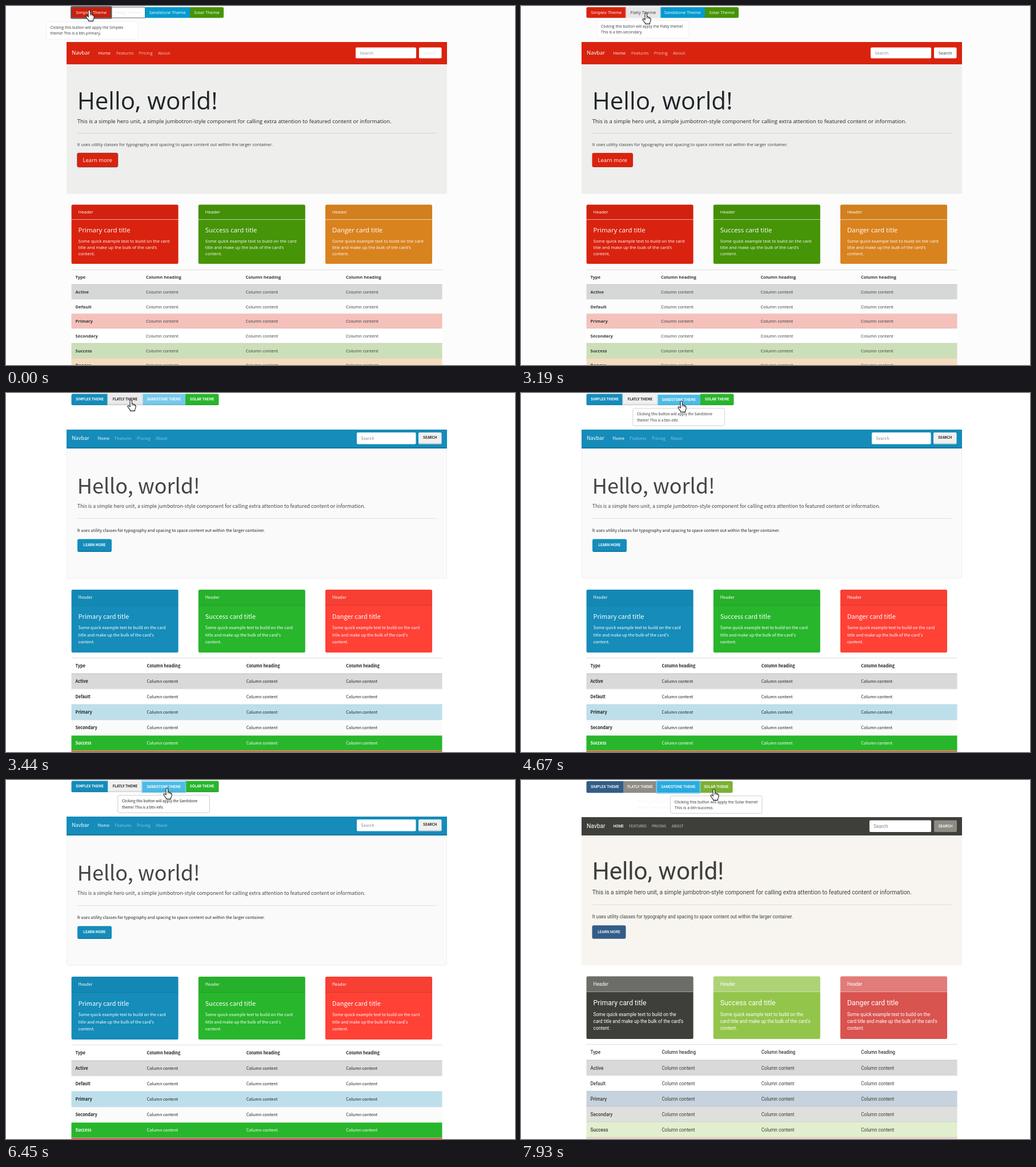
Recreate the animation shown at these times as an HTML page with a canvas. Size 891 by 628 pixels, loop 8 s.

```html
<!DOCTYPE html>
<html lang="en">
<head>
<meta charset="utf-8">
<title>Theme switcher</title>
<style>
html, body { margin: 0; width: 100%; height: 100%; overflow: hidden; background: #fff; }
canvas { display: block; }
</style>
</head>
<body>
<canvas id="stage" width="891" height="628"></canvas>
<script>
const ctx = document.getElementById('stage').getContext('2d');
const LOOP = 8000;
const LEFT = 106, RIGHT = 772;
const HAN = '"Noto Sans CJK JP", "Noto Sans CJK SC", "Noto Sans CJK", "Noto Sans", sans-serif';

function textWidth(weight) {
  ctx.font = `${weight} 100px ${HAN}`;
  return ctx.measureText('Hello, world!').width;
}
// Without a light face the regular one is used, which runs wider.
const hasLight = textWidth(300) < textWidth(400) - 1;
const lightSize = hasLight ? 1 : 0.957;

const themes = [
  {
    font: '"Open Sans", sans-serif', size: 7.6, tip: 6.65, bg: '#fcfcfc', ink: '#373a3c', heavy: 700,
    buttons: { x: [114.5, 184, 243.5, 322, 381], y: 2, h: 18.8, textY: 11.5, size: 7.6, weight: 400,
      fill: ['#d9230f', '#ffffff', '#029acf', '#469408'], hover: ['#c8200e', '#e6e6e6', '#0287b6', '#3c7e07'] },
    nav: { y: 63, h: 39, textY: 82, fill: '#d9230f', link: '#f5c3bd', x: [161.5, 193, 232.7, 266],
      brand: 9.5, size: 7.6, weight: 400, input: [612, 72.5, 106, 19], button: [723, 72.5, 39.5, 19] },
    hero: { bottom: 328.5, fill: '#eeeeed', base: 181, title: 42.1, lead: 9.5, light: 400, color: '#212529',
      leadY: 201.3, rule: 222, rest: 242.2, button: [124.5, 257, 71.5, 25], fill2: '#d9230f', label: 9.5, labelY: 269.7, weight: 400 },
    cards: { y: 347.5, h: 103.5, line: 373, headY: 360.3, title: 11.4, titleY: 392.2, textY: 411.2, pitch: 11.2,
      fill: ['#d9230f', '#469408', '#d9831f'], shade: 'rgba(0,0,0,.03)', edge: 'rgba(255,255,255,.6)',
      text: ['Some quick example text to build on the card', "title and make up the bulk of the card's"] },
    table: { top: 461, headY: 474, y: 487, pitch: 25.7, x: [121.5, 245, 419.5, 595],
      fill: ['#d6d8d7', '#fcfcfc', '#f4c1bb', '#ffffff', '#cbe0b9', '#f4dcbf'] },
    tipEdge: '#f0f0f0'
  },
  {
    font: HAN, size: 7.32, tip: 6.4, bg: '#ffffff', ink: '#222222', heavy: 700, upper: true, raised: true,
    buttons: { x: [114.5, 178.5, 238.5, 314, 372.5], y: 1.5, h: 19.7, textY: 10.7, size: 6.13, weight: 700,
      fill: ['#158cba', '#f0f0f0', '#75caeb', '#28b62c'], hover: ['#127ba3', '#eaeaea', '#4fbbe5', '#23a127'] },
    nav: { y: 64, h: 33, textY: 79, fill: '#158cba', link: '#8ac5dc', x: [160.5, 190.5, 229, 262],
      brand: 9.15, size: 7.32, weight: 400, input: [614, 69, 103.5, 20.5], button: [722, 69, 40.5, 20.5] },
    hero: { bottom: 324.5, fill: '#fafafa', base: 176, title: 37.66 * lightSize, lead: 9.15 * lightSize, light: 300,
      color: hasLight ? '#222222' : '#444444',
      leadY: 197.5, rule: 219, rest: 240, button: [125, 255.5, 60, 22.5], fill2: '#158cba', label: 6.13, labelY: 265.8, weight: 700 },
    cards: { y: 344, h: 110, line: 371, headY: 357.5, title: 10.98, titleY: 391, textY: 410.8, pitch: 12.35,
      fill: ['#158cba', '#28b62c', '#ff4136'], shade: 'rgba(0,0,0,.03)', edge: 'rgba(0,0,0,.13)',
      text: ['Some quick example text to build on the card', "title and make up the bulk of the card's"] },
    table: { top: 463, headY: 477, y: 490.5, pitch: 27.1, x: [121.5, 246.5, 420.7, 595.3], white: true,
      fill: ['#d9d9d9', '#ffffff', '#bddfec', '#fbfbfb', '#28b62c', '#ff4136'] },
    tipEdge: '#cccccc'
  },
  {
    font: 'Roboto, sans-serif', size: 8.18, tip: 7.16, bg: '#ffffff', ink: '#3e3f3a', heavy: 500, upper: true, upperNav: true,
    buttons: { x: [114.5, 179, 237.7, 313, 370.5], y: 2, h: 20.5, textY: 12, size: 6.43, weight: 500,
      fill: ['#325d88', '#8e8c84', '#29abe0', '#93c54b'], hover: ['#284a6c', '#7a7871', '#1b93c6', '#7cb033'] },
    nav: { y: 65, h: 32, textY: 80.5, fill: '#3e3f3a', link: '#a2a29f', x: [161.5, 189, 229, 263.5],
      brand: 10.23, size: 6.43, weight: 500, input: [610, 70.5, 108, 20.5], button: [723, 70.5, 40, 20.5] },
    hero: { bottom: 324.5, fill: '#f8f5f0', base: 174.3, title: 42.1, lead: 10.23, light: 400, color: '#3e3f3a',
      leadY: 196.3, rule: 218, rest: 238.7, button: [124.5, 254.3, 59, 23.5], fill2: '#325d88', label: 6.43, labelY: 265.8, weight: 500 },
    cards: { y: 343.5, h: 109.5, line: 370, headY: 357, title: 12.28, titleY: 390, textY: 410, pitch: 12.25,
      fill: ['#3e3f3a', '#93c54b', '#d9534f'], shade: 'rgba(255,255,255,.24)', edge: 'rgba(255,255,255,.5)',
      text: ['Some quick example text to build on the', "card title and make up the bulk of the card's"] },
    table: { top: 462, headY: 476.3, y: 489.8, pitch: 27.05, x: [121.5, 246.5, 420.7, 595.3],
      fill: ['#d9d9d9', '#ffffff', '#c6d2de', '#dfdfde', '#e1efcf', '#f0d3cd'] },
    tipEdge: '#cccccc'
  }
];

const labels = ['Simplex Theme', 'Flatly Theme', 'Sandstone Theme', 'Solar Theme'];
const applies = 'Clicking this button will apply the ';
const tooltips = [
  [70, 27, applies + 'Simplex', 'theme! This is a btn-primary.'],
  [132.5, 25, applies + 'Flatly theme!', 'This is a btn-secondary.'],
  [195.3, 26.3, applies + 'Sandstone', 'theme! This is a btn-info.'],
  [261, 27.3, applies + 'Solar theme!', 'This is a btn-success.']
];

// Each step changes part of the state and holds until the next one.
const steps = [
  [0, { theme: 0, mix: 0, focus: 0, hover: 0, press: 0, cursor: [146, 7], tips: { 0: 1 } }],
  [100, { mix: 0.5 }],
  [180, { mix: 1 }],
  [1020, { cursor: [166, 10] }],
  [1097, { cursor: [195, 14], hover: 1, tips: { 0: 0.5 } }],
  [1173, { cursor: [212, 15], tips: { 0: 0.1, 1: 0.5 } }],
  [1250, { cursor: [215, 15], tips: { 1: 1 } }],
  [1630, { cursor: [216, 14] }],
  [1710, { cursor: [218, 13] }],
  [1790, { cursor: [219, 12] }],
  [3120, { press: 0.5 }],
  [3190, { press: 1, focus: 1 }],
  [3290, { theme: 1, mix: 0.35, tips: { 1: 0.4 } }],
  [3370, { mix: 0.8, tips: {} }],
  [3440, { mix: 1 }],
  [4360, { cursor: [228, 12], tips: { 1: 0.6 } }],
  [4440, { cursor: [245, 14], hover: 2, tips: { 1: 0.9 } }],
  [4520, { cursor: [262, 15], tips: { 1: 0.5 } }],
  [4600, { cursor: [275, 15], tips: { 1: 0.1, 2: 0.4 } }],
  [4670, { cursor: [281, 14], tips: { 2: 0.9 } }],
  [4750, { cursor: [282, 14], tips: { 2: 1 } }],
  [6370, { press: 1 }],
  [6450, { focus: 2 }],
  [6530, { theme: 2, mix: 0.35 }],
  [6610, { mix: 0.8 }],
  [6690, { mix: 1 }],
  [7700, { cursor: [300, 15] }],
  [7780, { cursor: [322, 17], hover: 3, tips: { 2: 0.7 } }],
  [7860, { cursor: [336, 16], tips: { 2: 0.35, 3: 0.4 } }],
  [7930, { cursor: [338, 16], tips: { 2: 0.06, 3: 0.93 } }]
];

function stateAt(time) {
  return Object.assign({}, ...steps.filter(([start]) => start <= time).map(step => step[1]));
}

function blend(from, to, amount) {
  const channel = (hex, i) => parseInt(hex.slice(1 + 2 * i, 3 + 2 * i), 16);
  return `rgb(${[0, 1, 2].map(i => Math.round(channel(from, i) + (channel(to, i) - channel(from, i)) * amount))})`;
}

function box(x, y, w, h, fill, radius = 0, stroke) {
  ctx.beginPath();
  ctx.roundRect(x, y, w, h, radius);
  if (fill) { ctx.fillStyle = fill; ctx.fill(); }
  if (stroke) { ctx.strokeStyle = stroke; ctx.stroke(); }
}

// y is the middle of the capitals.
function text(theme, string, x, y, { size = theme.size, weight = 400, color = theme.ink, align = 'left' } = {}) {
  ctx.font = `${weight} ${size}px ${theme.font}`;
  ctx.textAlign = align;
  ctx.fillStyle = color;
  ctx.fillText(string, x, y + size * 0.36);
}

const label = (theme, string) => theme.upper ? string.toUpperCase() : string;

function buttonFill(state, i) {
  const now = themes[state.theme].buttons;
  const active = state.hover === i && (state.theme || i !== 1 || state.press);
  const fill = active ? now.hover[i] : now.fill[i];
  if (state.theme === 0 && i === 1 && active) return blend(now.fill[i], fill, state.press);
  return state.theme ? blend(themes[state.theme - 1].buttons.fill[i], fill, state.mix) : fill;
}

function drawButtons(theme, state) {
  const b = theme.buttons;
  labels.forEach((name, i) => {
    const x = b.x[i], w = b.x[i + 1] - x;
    const sink = theme.raised && i === 2 && state.hover === i ? 1.2 : 0;
    const radius = i === 0 ? [2.5, 0, 0, 2.5] : i === 3 ? [0, 2.5, 2.5, 0] : 0;
    const pale = i === 1 && state.theme < 2;
    box(x, b.y + sink, w, b.h - sink, buttonFill(state, i), radius);
    if (theme.raised) box(x, b.y + b.h - 2 + sink / 2, w, 2 - sink / 2, 'rgba(0,0,0,.11)', radius);
    if (pale && !state.theme && state.mix < 1) {
      ctx.lineWidth = 1;
      box(x, b.y, w, b.h, null, 0, `rgba(50,55,60,${0.75 * (1 - state.mix)})`);
    }
    ctx.globalAlpha = pale && !state.theme ? Math.max(0.12, state.mix) : 1;
    text(theme, label(theme, name), x + w / 2, b.textY + sink,
      { size: b.size, weight: b.weight, color: pale ? theme.ink : '#fff', align: 'center' });
    ctx.globalAlpha = 1;
  });
  drawFocus(theme, state);
}

function drawFocus(theme, state) {
  const b = theme.buttons, i = state.focus;
  const color = i === 0 ? blend('#5a5c66', '#ee9d94', state.mix)
    : i === 1 ? 'rgba(240,240,240,.5)' : 'rgba(130,207,240,.75)';
  ctx.lineWidth = 2;
  box(b.x[i] - 0.5, b.y - 0.8, b.x[i + 1] - b.x[i] + 1, b.h + 1.6, null, 1.5, color);
  ctx.lineWidth = 1;
}

function drawNav(theme, state) {
  const n = theme.nav;
  box(LEFT, n.y, RIGHT - LEFT, n.h, n.fill);
  if (theme.raised) box(LEFT, n.y + n.h - 2, RIGHT - LEFT, 2, 'rgba(0,0,0,.14)');
  text(theme, 'Navbar', 115, n.textY, { size: n.brand, color: '#fff' });
  ['Home', 'Features', 'Pricing', 'About'].forEach((name, i) => {
    text(theme, theme.upperNav ? name.toUpperCase() : name, n.x[i], n.textY,
      { size: n.size, weight: n.weight, color: i ? n.link : '#fff' });
  });
  const [ix, iy, iw, ih] = n.input;
  box(ix, iy, iw, ih, '#fff', 2);
  text(theme, 'Search', ix + 7.3, iy + ih / 2, { color: '#848a90' });
  const [x, y, w, h] = n.button;
  const was = themes[Math.max(0, state.theme - 1)].buttons.fill[1];
  box(x, y, w, h, blend(was, theme.buttons.fill[1], state.mix), 2);
  if (theme.raised) box(x, y + h - 2, w, 2, 'rgba(0,0,0,.11)', [0, 0, 2, 2]);
  ctx.globalAlpha = state.theme ? 1 : Math.max(0.12, state.mix);
  text(theme, label(theme, 'Search'), x + w / 2, y + h / 2 - (theme.raised ? 1 : 0),
    { size: theme.buttons.size, weight: theme.buttons.weight, color: state.theme < 2 ? theme.ink : '#fff', align: 'center' });
  ctx.globalAlpha = 1;
}

function drawHero(theme, state) {
  const h = theme.hero, top = theme.nav.y + theme.nav.h;
  box(LEFT, top, RIGHT - LEFT, h.bottom - top, h.fill, [0, 0, 3, 3]);
  if (theme.raised) box(LEFT + 0.5, top + 0.5, RIGHT - LEFT - 1, h.bottom - top - 1, null, [0, 0, 3, 3], '#eeeeee');
  const style = { weight: h.light, color: h.color };
  text(theme, 'Hello, world!', 124.7, h.base - h.title * 0.36, { ...style, size: h.title });
  text(theme, 'This is a simple hero unit, a simple jumbotron-style component for calling extra attention to featured content or information.',
    124.7, h.leadY, { ...style, size: h.lead });
  box(124.7, h.rule, 628.6, 1, 'rgba(0,0,0,.1)');
  text(theme, 'It uses utility classes for typography and spacing to space content out within the larger container.', 124.7, h.rest);
  const [x, y, w, height] = h.button;
  const was = themes[Math.max(0, state.theme - 1)].hero.fill2;
  const edge = !state.theme && state.mix < 1 ? `rgba(20,60,80,${0.4 * (1 - state.mix)})` : null;
  box(x, y, w, height, blend(was, h.fill2, state.mix), 3, edge);
  if (theme.raised) box(x, y + height - 2, w, 2, 'rgba(0,0,0,.13)', [0, 0, 3, 3]);
  text(theme, label(theme, 'Learn more'), x + w / 2, h.labelY,
    { size: h.label, weight: h.weight, color: '#fff', align: 'center' });
}

function drawCards(theme) {
  const c = theme.cards, color = '#fff', w = 187;
  ['Primary', 'Success', 'Danger'].forEach((name, i) => {
    const x = 114.6 + i * 222.2;
    box(x, c.y, w, c.h, c.fill[i], 2.5);
    box(x, c.y, w, c.line - c.y, c.shade, [2.5, 2.5, 0, 0]);
    box(x, c.line, w, 1, c.edge);
    text(theme, 'Header', x + 12, c.headY, { color });
    text(theme, name + ' card title', x + 12, c.titleY, { color, size: c.title });
    [...c.text, 'content.'].forEach((line, k) => text(theme, line, x + 12, c.textY + k * c.pitch, { color }));
  });
}

function drawTable(theme) {
  const t = theme.table, x = 114.5, w = 649, rule = 'rgba(0,0,0,.13)';
  box(x, t.top, w, 1, rule);
  ['Type', 'Column heading', 'Column heading', 'Column heading'].forEach((head, i) =>
    text(theme, head, t.x[i], t.headY, { weight: theme.heavy }));
  ['Active', 'Default', 'Primary', 'Secondary', 'Success', 'Danger'].forEach((name, i) => {
    const y = t.y + i * t.pitch, white = t.white && i > 3;
    const color = white ? '#fff' : theme.ink;
    box(x, y, w, t.pitch + 0.3, t.fill[i]);
    box(x, Math.round(y) - 0.5, w, 1, white ? 'rgba(255,255,255,.5)' : i ? 'rgba(0,0,0,.08)' : rule);
    [name, 'Column content', 'Column content', 'Column content'].forEach((cell, k) =>
      text(theme, cell, t.x[k], y + t.pitch / 2 + 0.3, { color, weight: k ? 400 : theme.heavy }));
  });
}

function drawTips(theme, state) {
  for (const [i, alpha] of Object.entries(state.tips)) {
    const [left, y, ...lines] = tooltips[i];
    const x = i === '1' && state.theme ? 128 : left;
    ctx.globalAlpha = alpha;
    box(x + 0.5, y + 0.5, 160.5, 30.5, '#fff', 2.5, theme.tipEdge);
    lines.forEach((line, k) => text(theme, line, x + 7.6, y + 10.8 + k * 10.2, { size: theme.tip }));
  }
  ctx.globalAlpha = 1;
}

const hand = new Path2D(`M-2 1.6 Q-1.8 0 -.3 0 Q1.3 0 1.4 1.6 L1.6 7 Q3.6 6.3 4.3 8 Q6 7.5 6.6 9
  Q8.2 9 8.2 11 Q8.4 14.5 6.6 17 L6.4 19.4 L-1.4 19.4 L-1.8 17.5 Q-4.2 15 -6 11.4 Q-5.6 9.4 -3.6 10.4 L-1.8 12.2 Z`);

function drawCursor([x, y]) {
  ctx.save();
  ctx.translate(x, y);
  ctx.lineJoin = 'round';
  ctx.fillStyle = '#fff';
  ctx.strokeStyle = '#1c1c1c';
  ctx.lineWidth = 1.1;
  ctx.fill(hand);
  ctx.stroke(hand);
  ctx.lineWidth = 0.8;
  ctx.stroke(new Path2D('M1.6 7V10 M4.3 8V10.4 M6.6 9V11'));
  ctx.restore();
}

function draw(time) {
  const state = stateAt(time), theme = themes[state.theme];
  box(0, 0, 891, 628, theme.bg);
  drawNav(theme, state);
  drawHero(theme, state);
  drawCards(theme);
  drawTable(theme);
  drawButtons(theme, state);
  drawTips(theme, state);
  drawCursor(state.cursor);
}

const start = performance.now();
function tick() {
  draw((performance.now() - start) % LOOP);
  requestAnimationFrame(tick);
}
tick();
</script>
</body>
</html>
```
